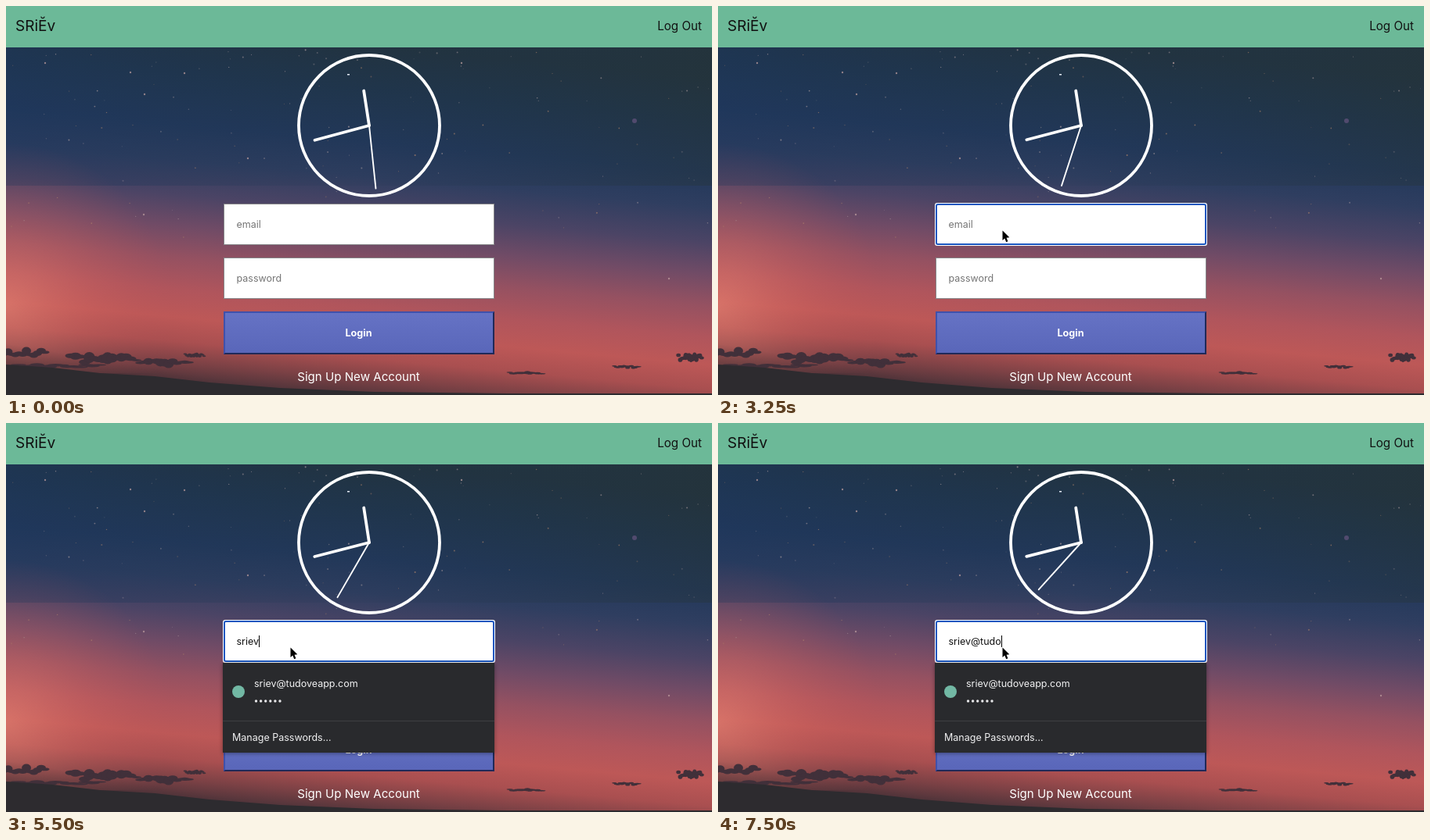
Recreate the animation shown at these times as an HTML page with a canvas. Size 902 px wide and 498 px high, loop 8000 ms.

```html
<!DOCTYPE html>
<html lang="en">
<head>
<meta charset="utf-8">
<title>Login</title>
<style>
  html, body { margin: 0; width: 100%; height: 100%; overflow: hidden; background: #22395c; }
  canvas { display: block; }
</style>
</head>
<body>
<canvas id="stage" width="902" height="498"></canvas>
<script>
const W = 902, H = 498, LOOP = 8000;
const ctx = document.getElementById('stage').getContext('2d');
const FONT = 'Inter, "Open Sans", sans-serif';
const EMAIL = 'sriev@tudoveapp.com';
const KEY_TIMES = [3500, 3750, 4000, 4250, 4500, 6250, 6750, 7000, 7250, 7500];
const POINTER = [[750, 352, 298], [1000, 357, 295], [1250, 360, 291], [1500, 362, 289], [1750, 363, 287]];

function text(g, str, x, y, size, color, align = 'left', weight = 400) {
  g.font = `${weight} ${size}px ${FONT}`;
  g.fillStyle = color;
  g.textAlign = align;
  g.fillText(str, x, y);
}

function rect(g, x, y, w, h, color) {
  g.fillStyle = color;
  g.fillRect(x, y, w, h);
}

function disc(g, x, y, r, color) {
  g.fillStyle = color;
  g.beginPath();
  g.arc(x, y, r, 0, Math.PI * 2);
  g.fill();
}

function poly(g, points, color) {
  g.fillStyle = color;
  g.beginPath();
  points.forEach(([x, y]) => g.lineTo(x, y));
  g.closePath();
  g.fill();
}

function shade(gradient, stops) {
  stops.forEach(([at, color]) => gradient.addColorStop(at, color));
  return gradient;
}

function seeded(seed) {
  return () => (seed = (seed * 16807) % 2147483647) / 2147483647;
}

function sky(g) {
  rect(g, 0, 0, W, H, shade(g.createLinearGradient(471, 53, 431, 498), [
    [0, '#22333f'], [.12, '#20354b'], [.27, '#22385a'], [.37, '#2f3e60'],
    [.47, '#4b4465'], [.56, '#704b66'], [.65, '#955161'], [.74, '#b0555c'],
    [.82, '#bd5857'], [.89, '#a94f50'], [.95, '#7b4145'], [1, '#50343a']
  ]));
  rect(g, 0, 0, W, 230, shade(g.createLinearGradient(0, 0, W, 0), [
    [0, 'rgba(28,54,92,.45)'], [.5, 'rgba(30,52,78,.1)'], [1, 'rgba(38,52,56,.4)']
  ]));
  rect(g, 0, 150, 300, 320, shade(g.createRadialGradient(0, 385, 0, 0, 385, 210), [
    [0, 'rgba(232,132,116,.6)'], [.5, 'rgba(215,105,98,.28)'], [1, 'rgba(190,85,88,0)']
  ]));
}

function stars(g) {
  const rnd = seeded(4127);
  for (let i = 0; i < 130; i++) {
    const x = rnd() * W, y = 56 + Math.pow(rnd(), 1.3) * 240;
    g.globalAlpha = .2 + rnd() * .45;
    disc(g, x, y, .5 + rnd() * .6, rnd() < .6 ? '#b5a3a4' : '#b88a6c');
  }
  g.globalAlpha = .7;
  [[50, 73], [159, 85], [177, 113], [228, 86], [176, 267], [582, 73], [847, 349], [309, 195]]
    .forEach(([x, y]) => disc(g, x, y, 1.2, '#c0a0a0'));
  disc(g, 803, 147, 3, '#67547f');
  g.globalAlpha = 1;
  rect(g, 436, 87, 3, 1.5, '#e8f0ff');
}

function cloud(g, x, y, w, h, seed) {
  const rnd = seeded(seed);
  g.fillStyle = '#41303a';
  for (let i = 0; i < 14; i++) {
    const u = (i + .5) / 14, bulge = Math.sin(u * Math.PI);
    g.beginPath();
    g.ellipse(x + u * w, y + (rnd() - .5) * h * .5, w * .09, h * (.15 + bulge * rnd() * .4), 0, 0, Math.PI * 2);
    g.fill();
  }
}

function land(g) {
  rect(g, 0, 430, 420, 68, shade(g.createLinearGradient(0, 432, -8, 480), [
    [0, 'rgba(70,45,50,0)'], [1, 'rgba(60,42,47,.75)']
  ]));
  cloud(g, -14, 444, 66, 12, 91);
  cloud(g, 80, 452, 82, 17, 233);
  cloud(g, 164, 456, 72, 10, 517);
  cloud(g, 228, 447, 26, 6, 771);
  cloud(g, 12, 461, 110, 7, 153);
  cloud(g, 858, 450, 32, 12, 311);
  cloud(g, 776, 462, 34, 5, 407);
  cloud(g, 642, 470, 45, 4, 619);
  poly(g, [[0, 459], [60, 463], [120, 470], [190, 474], [260, 482], [350, 489], [470, 494],
    [640, 496], [W, 496], [W, H], [0, H]], '#2d2b2f');
}

function input(g, y, label) {
  rect(g, 278, y, 346, 53, '#858588');
  rect(g, 279, y + 1, 344, 51, '#fff');
  text(g, label, 294.5, y + 31, 12.5, '#757575');
}

function button(g) {
  const x = 278, y = 391, r = 624, b = 446;
  rect(g, x, y, r - x, b - y, '#4051ab');
  poly(g, [[r, y], [r, b], [x, b], [x + 2, b - 2], [r - 2, b - 2], [r - 2, y + 2]], '#202958');
  rect(g, x + 2, y + 2, r - x - 4, b - y - 4, shade(g.createLinearGradient(0, y, 0, b), [
    [0, '#6673c5'], [1, '#5966b9']
  ]));
  text(g, 'Login', 450.5, 423, 12.6, '#fff', 'center', 700);
}

function buildScene() {
  const layer = document.createElement('canvas');
  layer.width = W;
  layer.height = H;
  const g = layer.getContext('2d');
  sky(g);
  stars(g);
  land(g);
  rect(g, 0, 0, W, 53, '#6cb998');
  text(g, 'SRiĔv', 12, 32, 19, '#111');
  text(g, 'Log Out', 889, 31, 15.2, '#111', 'right');
  input(g, 253, '');
  input(g, 322, 'password');
  button(g);
  text(g, 'Sign Up New Account', 450.5, 480, 15.1, '#fff', 'center');
  return layer;
}

function hand(turn, length, width) {
  const a = turn * Math.PI * 2;
  ctx.lineWidth = width;
  ctx.beginPath();
  ctx.moveTo(464, 153);
  ctx.lineTo(464 + Math.sin(a) * length, 153 - Math.cos(a) * length);
  ctx.stroke();
}

function clock(t) {
  const sec = 29 + Math.floor((t + 750) / 1000);
  const min = 42 + sec / 60;
  const hour = 11 + min / 60;
  ctx.strokeStyle = '#fff';
  ctx.lineCap = 'round';
  ctx.lineWidth = 3.8;
  ctx.beginPath();
  ctx.arc(464, 153, 90, 0, Math.PI * 2);
  ctx.stroke();
  hand(hour / 12, 45, 3.8);
  hand(min / 60, 72, 3.8);
  hand(sec / 60, 81, 1.9);
}

function focusRing() {
  ctx.fillStyle = '#fff';
  ctx.beginPath();
  ctx.roundRect(277, 252, 348, 55, 3);
  ctx.fill();
  ctx.strokeStyle = '#1b57c0';
  ctx.lineWidth = 2;
  ctx.beginPath();
  ctx.roundRect(279, 254, 344, 51, 2);
  ctx.stroke();
}

function caretOn(t) {
  const lastKey = KEY_TIMES.filter(k => k <= t).pop();
  const since = t - (lastKey ?? 1500);
  return Math.floor(since / 500) % 2 === 0;
}

function field(t) {
  const typed = EMAIL.slice(0, KEY_TIMES.filter(k => k <= t).length);
  const focused = t >= 1500;
  if (focused) focusRing();
  if (typed) text(ctx, typed, 294.5, 284, 12.5, '#111');
  else text(ctx, 'email', 294.5, 284, 12.5, '#757575');
  if (focused && caretOn(t)) {
    const x = typed ? 294.5 + ctx.measureText(typed).width : 295;
    rect(ctx, Math.round(x), 272, 1, 15, '#000');
  }
}

function dropdown() {
  ctx.save();
  ctx.shadowColor = 'rgba(0,0,0,.4)';
  ctx.shadowBlur = 5;
  ctx.shadowOffsetY = 1;
  rect(ctx, 277, 307, 347, 115, '#292a2d');
  ctx.restore();
  rect(ctx, 277, 381, 347, 1, '#3d3e42');
  disc(ctx, 297, 344, 8, '#72b8a4');
  text(ctx, EMAIL, 317, 338, 12.5, '#f1f1f2');
  for (let i = 0; i < 6; i++) disc(ctx, 319.5 + i * 6.1, 356, 1.7, '#e8e8ea');
  text(ctx, 'Manage Passwords…', 289, 407, 12.5, '#f1f1f2');
}

function pointer(t) {
  const at = POINTER.filter(p => p[0] <= t).pop();
  if (!at) return;
  ctx.save();
  ctx.translate(at[1], at[2]);
  ctx.lineJoin = 'round';
  ctx.beginPath();
  [[.5, .5], [.5, 13], [3.3, 10.4], [5.2, 15.2], [7.4, 14.3], [5.5, 9.7], [9.3, 9.3]]
    .forEach(([x, y]) => ctx.lineTo(x, y));
  ctx.closePath();
  ctx.strokeStyle = '#fff';
  ctx.lineWidth = 2;
  ctx.stroke();
  ctx.fillStyle = '#000';
  ctx.fill();
  ctx.restore();
}

const scene = buildScene();

function frame() {
  const t = Math.floor((performance.now() % LOOP) / 250) * 250;
  ctx.drawImage(scene, 0, 0);
  clock(t);
  field(t);
  if (t >= 3500) dropdown();
  pointer(t);
  requestAnimationFrame(frame);
}
frame();
</script>
</body>
</html>
```
